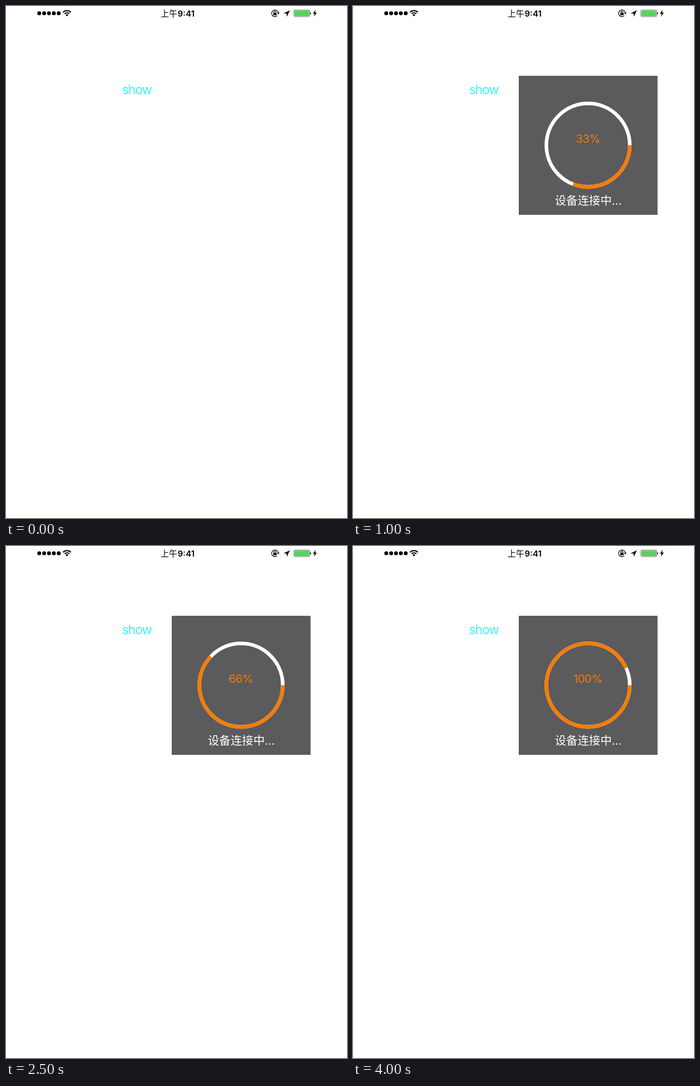
Animation, 611 px wide and 917 px high, one loop 4250 ms. Source, as an HTML page:

```html
<!DOCTYPE html>
<html lang="zh-CN">
<head>
<meta charset="utf-8">
<title>Progress ring</title>
<style>
  html, body { margin: 0; width: 100%; height: 100%; overflow: hidden; background: #fff; }
  svg { display: block; font-family: Inter, "Noto Sans CJK SC", "Noto Sans CJK", sans-serif; }
  .ring { fill: none; stroke-width: 6.5; }
</style>
</head>
<body>
<svg width="611" height="917" viewBox="0 0 611 917">
  <!-- status bar -->
  <path d="M59.6 13h35" stroke="#000" stroke-width="7" stroke-linecap="round" stroke-dasharray="0 8.72"/>
  <g fill="none" stroke="#000" stroke-width="2.1">
    <path d="M102.2 11.2a9.8 9.8 0 0 1 14 0"/>
    <path d="M105 14a5.9 5.9 0 0 1 8.4 0"/>
  </g>
  <path d="M109.2 18.6l-2.5-2.6a3.6 3.6 0 0 1 5 0z"/>
  <g font-size="15">
    <text x="277" y="18.6" font-weight="500">上午</text>
    <text x="307.5" y="18.6" font-weight="600">9:41</text>
  </g>
  <g fill="none" stroke="#000" stroke-width="1.2">
    <path d="M486.2 17.4a6 6 0 1 1 1.8-4.6"/>
    <path d="M480.1 12.6v-1.5a1.8 1.8 0 0 1 3.6 0v1.5"/>
  </g>
  <path d="M479 12.2h5.8v4.3H479zM485.6 12h4.6l-2.3 2.9z"/>
  <path d="M508.6 7.8L497.2 13.2l5.6.3.4 5.7z"/>
  <rect x="515.8" y="7.2" width="28.6" height="11.8" rx="2" fill="#fff" stroke="#666" stroke-width=".9"/>
  <rect x="516.8" y="8.2" width="26.6" height="9.8" rx="1.2" fill="#55d45b"/>
  <path d="M545 11.2q1.6.3 1.6 1.9t-1.6 1.9z"/>
  <path d="M554.6 6.8L550 13.8h3l-1.2 5.4 5.2-7.4h-3.2z"/>

  <text x="208" y="158" font-size="22.5" letter-spacing="-.9" fill="#3df2f5">show</text>

  <g id="panel">
    <path d="M297 125h248.7v249H297z" fill="#5b5a5c"/>
    <circle class="ring" cx="421.2" cy="249.3" r="74.7" stroke="#fff"/>
    <circle class="ring" id="arc" cx="421.2" cy="249.3" r="74.7" stroke="#f67c05" pathLength="360"/>
    <text id="label" x="421" y="245" font-size="20.5" letter-spacing="-.6" text-anchor="middle" fill="#f67c05"></text>
    <text x="361.7" y="356" font-size="20.4" fill="#fff">设备连接中<tspan>...</tspan></text>
  </g>
</svg>
<script>
  const LOOP = 4250, TICK = 250, STEPS = 6;
  const el = id => document.getElementById(id);
  const panel = el("panel"), arc = el("arc"), label = el("label");

  function draw(now) {
    const tick = Math.floor(now % LOOP / TICK);
    const angle = 54.9 + 18.72 * (tick - 1);
    // the label shows the step the arc is heading for
    const step = Math.ceil(angle / 360 * STEPS);
    panel.style.display = tick ? "" : "none";
    arc.setAttribute("stroke-dasharray", `${angle} 360`);
    label.textContent = Math.floor(step * 100 / STEPS) + "%";
  }

  const start = performance.now();
  function loop() {
    draw(performance.now() - start);
    requestAnimationFrame(loop);
  }
  loop();
</script>
</body>
</html>
```
